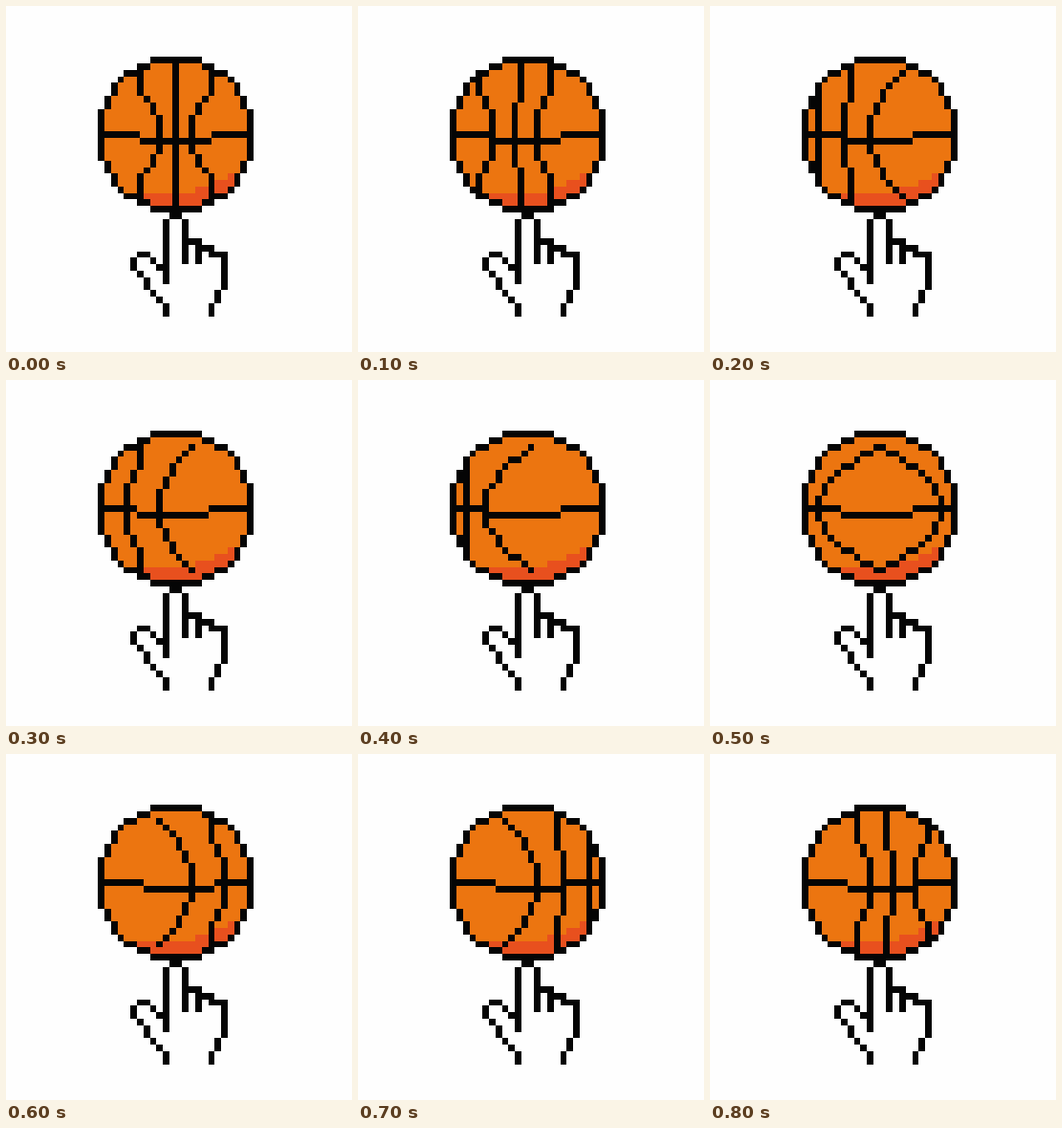
An HTML page with a canvas for the animation above (0.9 s loop, 362 by 362 pixels).

```html
<!DOCTYPE html>
<html lang="en">
<head>
<meta charset="utf-8">
<title>Spinning basketball</title>
<style>
  html, body { margin: 0; height: 100%; overflow: hidden; background: #fefefe; }
  canvas { display: block; }
</style>
</head>
<body>
<canvas id="stage" width="362" height="362"></canvas>
<script>
const ctx = document.getElementById('stage').getContext('2d');
const CELL = 6.78, LEFT = 96.3, TOP = 53.3, SIZE = 24, HALF = SIZE / 2, STEP = 100;
const INK = '#050505', ORANGE = '#ec7510', SHADE = '#e8501e';

// Fill a block of art cells, snapped to whole screen pixels.
function block(x, y, w, h, color = INK) {
  const px = Math.round(LEFT + x * CELL), py = Math.round(TOP + y * CELL);
  ctx.fillStyle = color;
  ctx.fillRect(px, py, Math.round(LEFT + (x + w) * CELL) - px, Math.round(TOP + (y + h) * CELL) - py);
}

// The lower half of the ball mirrors the upper one.
function bothHalves(x, y, w) {
  block(x, y, w, 1);
  block(x, SIZE - 1 - y, w, 1);
}

// Empty cells beside the ball in a row.
function inset(row) {
  const rise = row - (SIZE - 1) / 2;
  return Math.floor(HALF + 0.25 - Math.sqrt(HALF ** 2 - rise ** 2));
}

const inShade = (x, y) => Math.hypot(x - 9, y + 1) > 21.7;

function drawFill() {
  for (let y = 0; y < SIZE; y++) {
    for (let x = inset(y); x < SIZE - inset(y); x++) {
      block(x, y, 1, 1, inShade(x, y) ? SHADE : ORANGE);
    }
  }
}

function drawOutline() {
  for (let y = 0; y < HALF; y++) {
    const x = inset(y), width = Math.max(1, (y ? inset(y - 1) : HALF) - x);
    bothHalves(x, y, width);
    bothHalves(SIZE - x - width, y, width);
  }
}

// A seam lists its column for each row of the upper half.
function seam(firstRow, columnAt) {
  return Array.from({ length: HALF }, (_, y) => ({ x: columnAt(y), y })).slice(firstRow);
}

// S-shaped seam, eased from its column at the top to the one at the middle.
function bend(top, middle) {
  return seam(1, y => {
    const t = Math.min(1, Math.max(0, (10 - y) / 6));
    return middle + Math.round((top - middle) * (1 - Math.cos(Math.PI * t)) / 2);
  });
}

// Parabolic seam that bulges sideways at the middle.
function bow(top, middle) {
  return seam(2, y => middle + Math.round((top - middle) * ((11.5 - y) / 9.5) ** 2));
}

function drawSeam(cells) {
  cells.forEach(({ x, y }, i) => {
    if (x < inset(y) || x >= SIZE - inset(y)) return;
    const above = i ? cells[i - 1].x : x;
    const from = Math.min(x, above + 1), to = Math.max(x + 1, above);
    bothHalves(from, y, to - from);
  });
}

function drawEquator(start) {
  block(0, 11.5, start, 1);
  block(start, 12.5, 11, 1);
  block(start + 11, 11.5, 13 - start, 1);
}

const flip = cells => cells.map(({ x, y }) => ({ x: 23 - x, y }));
const pose = (equator, ...seams) => ({ equator, seams });
const mirror = ({ equator, seams }) => pose(13 - equator, ...seams.map(flip));

const front = pose(6.5, bend(6, 9), bend(11.5, 11.5), bend(17, 14));
const turned = pose(7, bend(8, 10), bend(12.5, 13.5), bend(19, 17));
const quarter = pose(7, bow(8, 13), bend(16, 17), bend(21, 21));
const wide = pose(6, bend(6, 4), bow(14, 9));
const wider = pose(6, bend(2, 2), bow(12, 5));
const back = pose(6, bow(11, 2), bow(12, 21));

const poses = [front, mirror(turned), mirror(quarter), wide, wider, back, mirror(wide), quarter, turned];

// Trace cells along straight or diagonal lines between points.
function trace(...points) {
  points.slice(1).forEach(([x, y], i) => {
    const [fromX, fromY] = points[i];
    const steps = Math.max(Math.abs(x - fromX), Math.abs(y - fromY));
    for (let s = 0; s <= steps; s++) {
      block(fromX + (x - fromX) * s / steps, fromY + (y - fromY) * s / steps, 1, 1);
    }
  });
}

function drawHand() {
  block(11, 24, 2, 1);
  trace([10, 25], [10, 34]);
  trace([13, 25], [13, 31]);
  for (let i = 0; i < 3; i++) block(13 + 2 * i, 28 + i, 3, 1);
  trace([15, 29], [15, 31]);
  trace([17, 29], [17, 30]);
  trace([19, 30], [19, 35], [18, 36], [18, 37], [17, 38], [17, 39]);
  trace([9, 32], [7, 30], [6, 30], [5, 31], [5, 32], [7, 34], [7, 35], [10, 38], [10, 39]);
}

function draw() {
  const { equator, seams } = poses[Math.floor(performance.now() / STEP) % poses.length];
  ctx.fillStyle = '#fefefe';
  ctx.fillRect(0, 0, 362, 362);
  drawFill();
  seams.forEach(drawSeam);
  drawEquator(equator);
  drawOutline();
  drawHand();
  requestAnimationFrame(draw);
}
draw();
</script>
</body>
</html>
```
